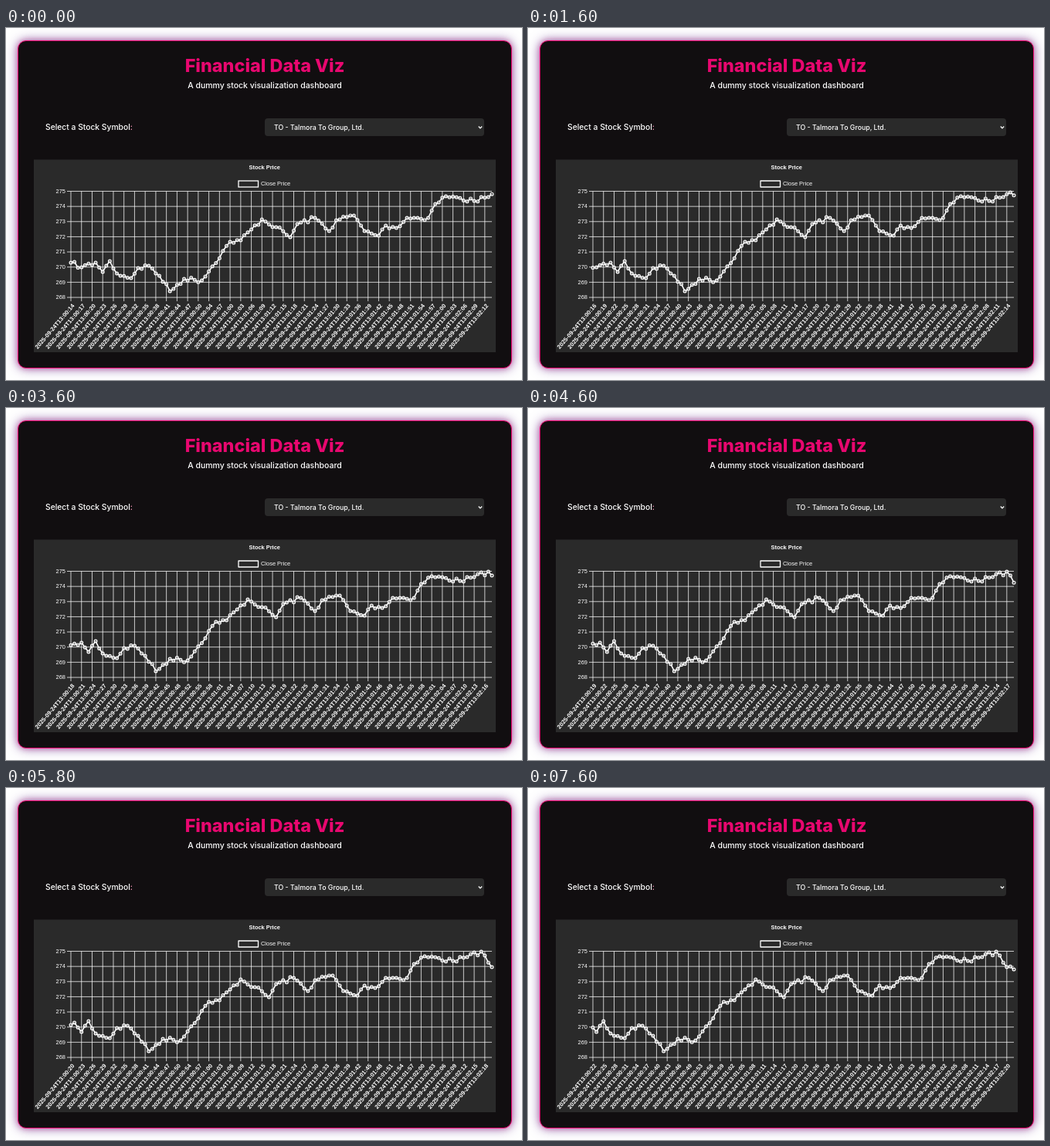
Write an HTML page with a canvas that moves like this. It is 668 px wide and 456 px high and loops after 8 s.

```html
<!DOCTYPE html>
<html lang="en">
<head>
<meta charset="utf-8">
<title>Financial Data Viz</title>
<style>
html, body { margin: 0; width: 100%; height: 100%; overflow: hidden; background: #fff; }
#stage { position: relative; width: 668px; height: 456px; overflow: hidden; font-family: Inter, "Open Sans", sans-serif; font-weight: 500; color: #fff; }
#stage > * { position: absolute; box-sizing: border-box; white-space: nowrap; }
#card { left: 14.5px; top: 15.5px; width: 640.5px; height: 425px; border: 1.3px solid #ec0a72; border-radius: 11px; background: #110e10; box-shadow: 0 0 7px rgba(200, 30, 130, .5), 0 0 15px rgba(80, 30, 130, .6); }
h1, p { margin: 0; left: 0; width: 670px; text-align: center; }
h1 { top: 34px; font-size: 23.4px; line-height: 30px; font-weight: 800; color: #e8076f; }
p { top: 67px; font-size: 10.5px; line-height: 15px; }
#label { left: 51px; top: 121px; font-size: 10.3px; line-height: 15px; }
#label b { font-weight: 500; color: #ff9cc0; }
#select { left: 335px; top: 117px; width: 284px; height: 23px; padding-left: 12px; border-radius: 4px; background: #2a2a2a; font-size: 8.8px; line-height: 23px; }
#select svg { position: absolute; right: 2px; top: 9px; }
canvas { left: 0; top: 0; width: 668px; height: 456px; }
</style>
</head>
<body>
<div id="stage">
  <div id="card"></div>
  <h1>Financial Data Viz</h1>
  <p>A dummy stock visualization dashboard</p>
  <div id="label">Select a Stock Symbol<b>:</b></div>
  <div id="select">TO - Talmora To Group, Ltd.<svg width="6" height="6"><path d="M.8 1.5 3 3.9 5.2 1.5" fill="none" stroke="#fff" stroke-width="1.3"/></svg></div>
  <canvas id="chart"></canvas>
</div>
<script>
const LOOP = 8000, COUNT = 120;
const STEPS = [600, 1400, 2400, 3400, 4600, 5400, 6400, 7400];
const AREA = { left: 84, right: 629, top: 211.5, bottom: 349 };
const MIN = 268, MAX = 275, UNIT = (AREA.bottom - AREA.top) / (MAX - MIN);
const GAP = (AREA.right - AREA.left) / (COUNT - 1);

// Main turns of the price curve: [second, height in pixels].
const TURNS = [
  [0, 304], [3, 310], [7, 304], [9, 316], [11, 302], [13, 318], [17, 324], [19, 311],
  [22, 308], [25, 321], [28, 341], [32, 325], [37, 327], [45, 277], [48, 275], [54, 248],
  [58, 258], [62, 271], [64, 254], [69, 246], [73, 263], [75, 249], [80, 243], [83, 263],
  [87, 269], [89, 256], [92, 259], [95, 246], [101, 246], [103, 228], [106, 218], [114, 224],
  [118, 219], [122, 212], [125, 232], [127, 235]
];

function seeded(seed) {
  return () => (seed = (seed * 16807) % 2147483647) / 2147483647;
}

// Straight runs between the turns, roughened a little.
function makeHeights() {
  const random = seeded(7);
  const out = [TURNS[0][1]];
  for (let k = 1; k < TURNS.length; k++) {
    const [i0, y0] = TURNS[k - 1], [i1, y1] = TURNS[k];
    for (let i = i0 + 1; i <= i1; i++) {
      const jitter = i < i1 ? (random() - 0.5) * 6 : 0;
      const y = y0 + (y1 - y0) * (i - i0) / (i1 - i0) + jitter;
      out.push(Math.max(AREA.top, y));
    }
  }
  return out;
}
const heights = makeHeights();

const canvas = document.getElementById('chart');
const ctx = canvas.getContext('2d');
const ratio = Math.max(1, window.devicePixelRatio || 1);
canvas.width = 668 * ratio;
canvas.height = 456 * ratio;

const xAt = i => AREA.left + i * GAP;

function line(x1, y1, x2, y2) {
  ctx.beginPath();
  ctx.moveTo(x1, y1);
  ctx.lineTo(x2, y2);
  ctx.stroke();
}

function text(str, x, y, align, weight = '', size = 7.45) {
  ctx.font = `${weight} ${size}px "Liberation Sans", Arial, sans-serif`;
  ctx.textAlign = align;
  ctx.fillText(str, x, y);
}

// The clock skips 13:00:51.
function stamp(i) {
  const s = 14 + i + (i >= 37 ? 1 : 0);
  const pad = n => String(n).padStart(2, '0');
  return `2025-09-24T13:${pad(Math.floor(s / 60))}:${pad(s % 60)}`;
}

function drawFrame() {
  ctx.fillStyle = '#2a2a2a';
  ctx.fillRect(36, 170.5, 598, 249.5);
  ctx.fillStyle = ctx.strokeStyle = '#fff';
  ctx.textBaseline = 'middle';
  text('Stock Price', 334.7, 181.3, 'center', 'bold');
  text('Close Price', 330, 201.8, 'left');
  ctx.lineWidth = 1.3;
  ctx.strokeRect(301, 198, 25.5, 8);
}

function drawAxes(first) {
  ctx.lineWidth = 0.75;
  for (let v = MIN; v <= MAX; v++) {
    const y = AREA.bottom - (v - MIN) * UNIT;
    line(AREA.left - 5, y, AREA.right, y);
    text(v, 77, y + 0.3, 'right');
  }
  for (let i = 0; i < COUNT; i += 3) {
    const x = xAt(i);
    line(x, AREA.top, x, AREA.bottom + 5);
    ctx.save();
    ctx.translate(x, 355.8);
    ctx.rotate(-49.5 * Math.PI / 180);
    text(stamp(first + i), 0, 4.5, 'right', 'bold', 7.6);
    ctx.restore();
  }
}

function drawSeries(first) {
  const shown = heights.slice(first, first + COUNT);
  ctx.lineWidth = 1.6;
  ctx.lineJoin = 'round';
  ctx.beginPath();
  shown.forEach((y, i) => ctx.lineTo(xAt(i), y));
  ctx.stroke();
  ctx.lineWidth = 1.2;
  ctx.fillStyle = 'rgba(42,42,42,.35)';
  shown.forEach((y, i) => {
    ctx.beginPath();
    ctx.arc(xAt(i), y, 1.9, 0, Math.PI * 2);
    ctx.fill();
    ctx.stroke();
  });
}

let last = -1;
function tick(now) {
  const t = now % LOOP;
  const first = STEPS.filter(s => s <= t).length;
  if (first !== last) {
    last = first;
    ctx.setTransform(ratio, 0, 0, ratio, 0, 0);
    ctx.clearRect(0, 0, 668, 456);
    drawFrame();
    drawAxes(first);
    drawSeries(first);
  }
  requestAnimationFrame(tick);
}
tick(performance.now());
</script>
</body>
</html>
```
